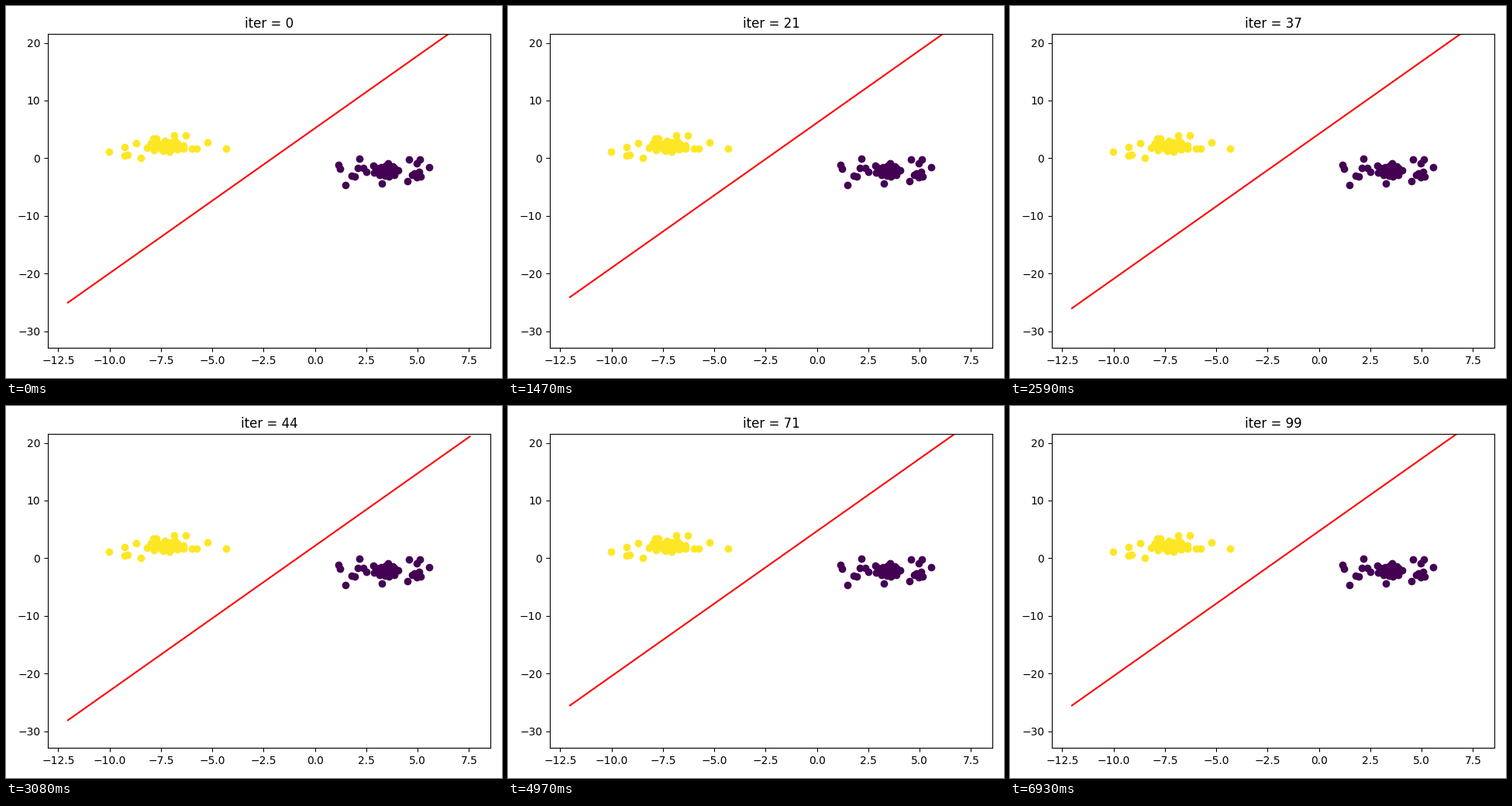
Animation, 640 px wide and 480 px high, one loop 7000 ms. Source, as a matplotlib script:

```python
import numpy as np
import matplotlib.pyplot as plt
from matplotlib.animation import FuncAnimation

FRAMES, INTERVAL = 100, 70
SLOPE = 2.513
X_ENDS = np.array([-12.03, 7.54])
GOLDEN_ANGLE = np.pi * (3 - 5 ** 0.5)

# The boundary drifts between these (iteration, intercept) pairs, then rests
DRIFT = [(0, 5.2), (14, 7.28), (28, 5.0), (37, 4.22), (44, 2.15), (52, 4.7)]

# Lone points around the dense core of each class
LEFT_RIM = [
    (-10.03, 1.1), (-9.28, 2.0), (-9.27, 0.5), (-9.11, 0.6), (-8.7, 2.6),
    (-8.48, 0.1), (-7.88, 3.45), (-7.71, 3.45), (-6.84, 3.95), (-6.31, 4.0),
    (-5.98, 1.6), (-5.75, 1.7), (-5.23, 2.8), (-4.32, 1.7),
]
RIGHT_RIM = [
    (1.13, -1.2), (1.22, -1.8), (1.47, -4.6), (1.79, -3.0), (1.93, -3.2),
    (2.07, -1.75), (2.18, -0.1), (2.35, -1.7), (2.52, -2.4), (2.84, -1.25),
    (3.25, -4.4), (3.54, -0.95), (4.5, -4.0), (4.56, -0.15), (4.94, -0.9),
    (5.11, -0.15), (5.54, -1.6),
]


def core(center, radii, n):
    """Fill an ellipse evenly with n points along a sunflower spiral."""
    k = np.arange(n)
    r = np.sqrt((k + 0.5) / n)
    turn = k * GOLDEN_ANGLE
    unit = np.column_stack([r * np.cos(turn), r * np.sin(turn)])
    return np.array(center) + unit * radii


left = np.vstack([LEFT_RIM, core((-7.28, 2.1), (0.97, 1.05), 27)])
right = np.vstack([
    RIGHT_RIM,
    core((3.48, -2.25), (0.62, 1.05), 26),
    core((4.94, -2.85), (0.24, 0.75), 6),
])

fig, ax = plt.subplots(figsize=(6.4, 4.8), dpi=100)
ax.scatter(*left.T, c="#fde725")
ax.scatter(*right.T, c="#440154")
line, = ax.plot(X_ENDS, SLOPE * X_ENDS, color="red")
title = ax.set_title("iter = 0")
ax.set_xlim(-13.01, 8.54)
ax.set_ylim(-32.9, 21.55)
fig.tight_layout()
fig.subplots_adjust(top=444 / 480)


def update(i):
    line.set_ydata(SLOPE * X_ENDS + np.interp(i, *zip(*DRIFT)))
    title.set_text(f"iter = {i}")
    return line, title


anim = FuncAnimation(fig, update, frames=FRAMES, interval=INTERVAL, repeat=True)
plt.show()
```
